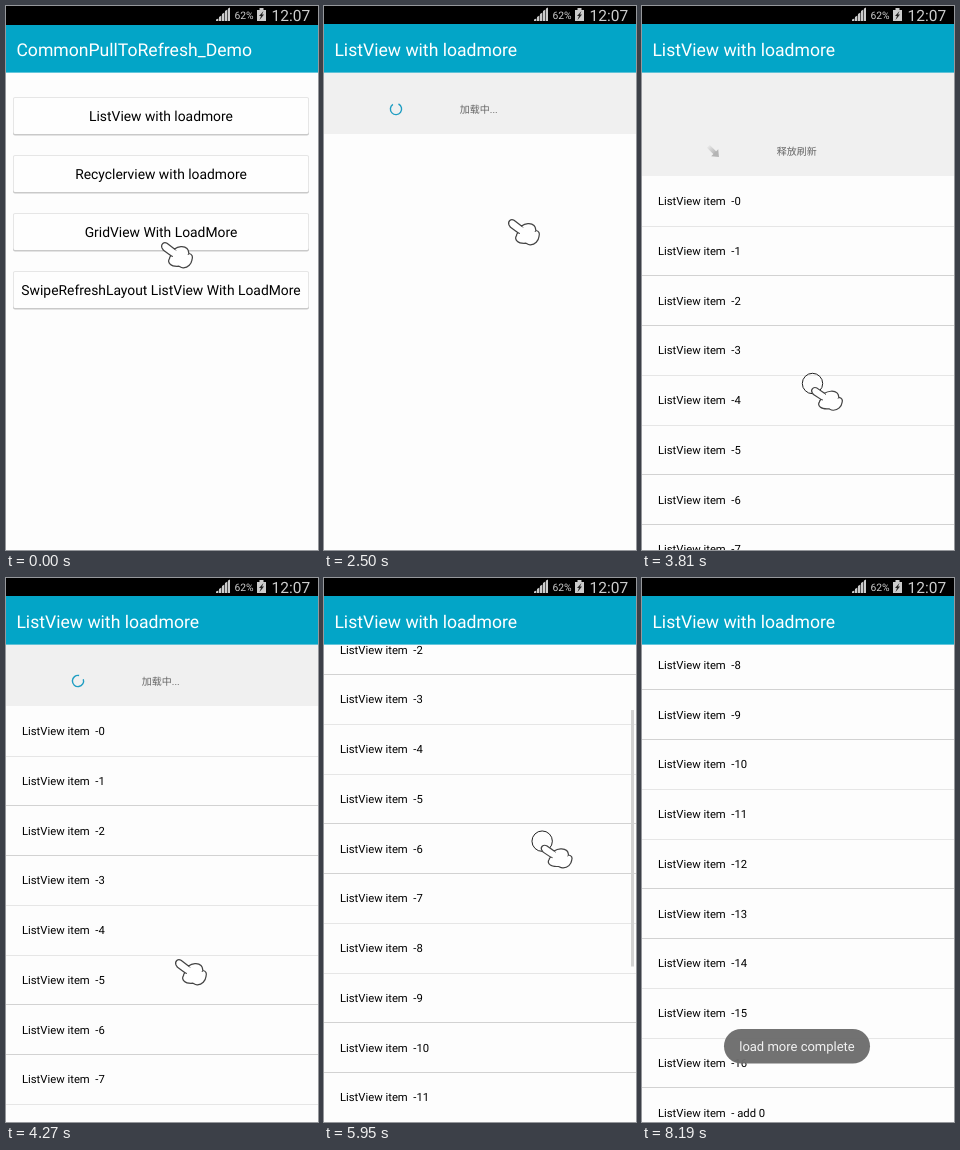
These frames come from a looping animation (312x544 px, 8.74 s). An HTML page:

```html
<!DOCTYPE html>
<html lang="zh-CN">
<head>
<meta charset="utf-8">
<title>Pull to refresh</title>
<style>
  html, body { margin: 0; width: 100%; height: 100%; overflow: hidden; background: #fdfdfd; }
  svg { display: block; width: 312px; height: 544px; }
  text {
    font-family: Roboto, "Noto Sans CJK SC", "Noto Sans CJK", sans-serif;
    white-space: pre;
    text-rendering: geometricPrecision;
  }
  .mid { text-anchor: middle; }
  .title { font-size: 17.6px; fill: #fff; }
  .button { font-size: 13.87px; }
  .row { font-size: 11.27px; }
  .state { font-size: 10px; fill: #666; }
  .footer { font-size: 11.7px; fill: #999; }
  .toast { font-size: 13px; fill: #f2f2f2; }
  .status { fill: #ccc; }
</style>
</head>
<body>
<svg viewBox="0 0 312 544">
  <defs>
    <linearGradient id="fade" x1="0" y1="0" x2="0" y2="1">
      <stop offset="0" stop-color="#b4b4b4" stop-opacity=".15"/>
      <stop offset="1" stop-color="#b4b4b4"/>
    </linearGradient>
  </defs>
  <rect width="312" height="544" fill="#fdfdfd"/>

  <g id="menu"></g>

  <g id="list">
    <rect id="band" y="66" width="312" fill="#f0f0f0"/>
    <g id="header">
      <path id="spinner" d="M2.500 -5A5.600 5.600 0 1 1 -3.100 -4.660" fill="none" stroke="#1e9dc2" stroke-width="1.4"/>
      <g id="arrow">
        <rect x="-2" y="-8" width="4" height="10" fill="url(#fade)"/>
        <path d="M-5 1H5L0 7Z" fill="#b4b4b4"/>
      </g>
      <text id="state" class="state mid" x="154.8" y="-21"></text>
    </g>
    <g id="rows"></g>
    <text id="footer" class="footer" x="134.5">正在加载中...</text>
    <rect id="bar" x="307" width="3" fill="#d2d2d2"/>
    <g id="toast">
      <rect x="82" y="451" width="146" height="34.5" rx="17.2" fill="#6d6d6d" fill-opacity=".96"/>
      <text class="toast mid" x="155" y="473">load more complete</text>
    </g>
  </g>

  <rect y="18" width="312" height="48.6" fill="#03a5c7"/>
  <text id="title" class="title" x="10.4" y="50"></text>
  <rect id="status" width="312"/>
  <g class="status">
    <path d="M210 15v-1.500l2.400 -1v2.500zM213 15v-4l2.400 -1.500v5.500zM216 15v-7l2.400 -1.500v8.500zM219 15v-10l2.400 -1.500v11.500zM222 15v-12.500l2 -1v13.500z"/>
    <text x="228.5" y="13" font-size="10.3">62%</text>
    <path d="M251 4h2.500v-2h4v2h2.500v11h-9z"/>
    <path d="M257.500 5l-4.500 5h2l-1.500 4 4.500-5.500h-2z" fill="#222"/>
    <text x="265.5" y="15" font-size="15.5">12:07</text>
  </g>

  <g id="hand">
    <circle id="press" cx="1.5" cy="-3.5" r="10.2" fill="none" stroke="#222"/>
    <g id="grip" stroke="#444">
      <path d="M1 6C-.5 2 3 -.5 6 1.200L13.500 7C17 4.500 23 3.500 26 6.500C28 8.500 27.500 10 27.800 11.500C31 12 32 14.500 31 17.500C30.500 22 27 25.500 22.500 25.800C20 26 19.500 25 18 24.200C14 24.500 11 24 9.500 22.500C7.500 21 7 18.500 8.500 16.500C8.500 15 9 14.500 10 13.800L2.500 8.300Z"
        fill="#fff" stroke-width="1.25" stroke-linejoin="round"/>
      <path d="M13.500 7L15 8.500M10 13.800L12 14.500M27.800 11.500L27 13" fill="none"/>
    </g>
  </g>
</svg>

<script>
const LOOP = 8740, TOP = 67, VIEW = 477, ROW = 49.75, FOOT = 34.5, ITEMS = 17;
const CONTENT = ITEMS * ROW + FOOT, MAX_SCROLL = CONTENT - VIEW;

const $ = id => document.getElementById(id);
const make = (parent, tag, attrs, text = '') => {
  const el = document.createElementNS('http://www.w3.org/2000/svg', tag);
  for (const name in attrs) el.setAttribute(name, attrs[name]);
  el.textContent = text;
  return parent.appendChild(el);
};
const show = (el, on) => { el.style.display = on ? '' : 'none'; };
const move = (el, x, y, turn = 0) => el.setAttribute('transform', `translate(${x} ${y}) rotate(${turn})`);

['ListView with loadmore', 'Recyclerview with loadmore', 'GridView With LoadMore',
 'SwipeRefreshLayout ListView With LoadMore'].forEach((label, i) => {
  const y = 91 + i * 58, menu = $('menu');
  make(menu, 'rect', { x: 7, y: y + 1, width: 296, height: 37.4, rx: 2, fill: '#c9c9c9' });
  make(menu, 'rect', { x: 7, y, width: 296, height: 37, rx: 2, fill: '#e6e6e6' });
  make(menu, 'rect', { x: 8, y: y + 1, width: 294, height: 36, rx: 1, fill: '#fefefe' });
  make(menu, 'text', { x: 155, y: y + 24, class: 'button mid' }, label);
});

const rows = Array.from({ length: ITEMS + 1 }, (_, i) => ({
  text: make($('rows'), 'text', { x: 16, class: 'row' }, 'ListView item  -' + (i < ITEMS ? i : ' add 0')),
  line: make($('rows'), 'rect', { width: 312, height: 1 })
}));

// Tracks hold [tick, value, ...] keys with linear motion between them.
const handTrack = [
  [0, 155, 236], [1, 147, 279], [2, 143, 270], [3, 141, 240], [4, 146, 200], [5, 157, 160],
  [6, 172, 120], [7, 180, 106], [8, 180, 103], [9, 181, 115], [16, 184, 213], [24, 172, 205],
  [25, 171, 215], [27, 169, 381], [31, 169, 381], [39, 169, 275], [43, 200, 400],
  [46, 225, 200], [50, 251, 346], [56, 246, 79], [58, 244, 41]
];
const pullTrack = [[9, 0], [10, 61], [21, 61], [23, 0], [25, 0], [27, 103], [28, 103], [30, 61], [37, 61], [39, 24], [40, 0]];
const scrollTrack = [[43, 0], [44, 45], [45, 120], [46, 225], [47, 320], [48, 375], [49, 396], [50, MAX_SCROLL]];
const turnTrack = [[26, 0], [27, -45], [28, -180]];
const barTrack = [[43, 0], [44, 1], [57, 1], [59, 0]];
const toastTrack = [[57, 0], [60, 1]];

function at(track, tick) {
  const i = track.findIndex(key => key[0] >= tick);
  if (i < 1) return track.at(i).slice(1);
  const a = track[i - 1], b = track[i], f = (tick - a[0]) / (b[0] - a[0]);
  return a.slice(1).map((v, n) => v + (b[n + 1] - v) * f);
}

// The picture advances in discrete ticks.
function tickAt(ms) {
  if (ms < 120) return 0;
  if (ms < 360) return 1;
  if (ms < 1660) return 2 + Math.min(6, Math.floor((ms - 360) / 115));
  return 9 + Math.min(55, Math.floor((ms - 1660) / 118.5));
}

const within = (tick, from, to) => tick >= from && tick <= to;

function drawHeader(tick, pull) {
  const loading = tick < 18 || within(tick, 30, 34);
  const pulling = within(tick, 24, 29);
  $('band').setAttribute('height', pull && pull + 1);
  move($('header'), 0, TOP + pull);
  $('state').textContent = loading ? '加载中...' : !pulling ? '更新完成.' : tick < 27 ? '下拉刷新' : '释放刷新';
  move($('spinner'), 72, -25, (tick - 16) * 75);
  move($('arrow'), 72, -24, at(turnTrack, tick)[0]);
  show($('spinner'), loading);
  show($('arrow'), pulling);
  show($('header'), pull > 0);
}

function drawRows(tick, pull) {
  const [scroll] = at(scrollTrack, tick);
  const filled = tick >= 18, more = tick >= 58;
  const start = TOP + pull - scroll;
  rows.forEach(({ text, line }, i) => {
    const top = start + i * ROW, edge = top + ROW, part = edge - Math.floor(edge);
    const on = i < ITEMS ? filled : more;
    text.setAttribute('y', Math.round(top) + 29);
    line.setAttribute('y', Math.round(edge - .2));
    line.setAttribute('fill', part > .2 && part < .55 ? '#d2d2d2' : '#e6e6e6');
    show(text, on);
    show(line, on);
  });
  $('footer').setAttribute('y', start + ITEMS * ROW + 20.5);
  show($('footer'), filled && !more);
  $('bar').setAttribute('y', TOP + scroll * VIEW / CONTENT);
  $('bar').setAttribute('height', VIEW * VIEW / CONTENT - 2);
  $('bar').setAttribute('opacity', at(barTrack, tick)[0]);
  $('toast').setAttribute('opacity', at(toastTrack, tick)[0]);
}

function drawHand(tick) {
  const pressed = tick === 7 || within(tick, 25, 27) || within(tick, 43, 46);
  move($('hand'), ...at(handTrack, tick));
  $('grip').setAttribute('transform', `scale(1 ${pressed ? .9 : 1})`);
  show($('press'), pressed);
  show($('hand'), tick < 60);
}

let last = -1;
function frame(now) {
  const tick = tickAt(now % LOOP);
  if (tick === last) return;
  last = tick;
  const inList = tick >= 9, [pull] = at(pullTrack, tick);
  show($('menu'), !inList);
  show($('list'), inList);
  $('title').textContent = inList ? 'ListView with loadmore' : 'CommonPullToRefresh_Demo';
  $('status').setAttribute('height', inList ? 18 : 19);
  drawHeader(tick, pull);
  drawRows(tick, pull);
  drawHand(tick);
}

const origin = performance.now();
(function loop() {
  frame(performance.now() - origin);
  requestAnimationFrame(loop);
})();
</script>
</body>
</html>
```
